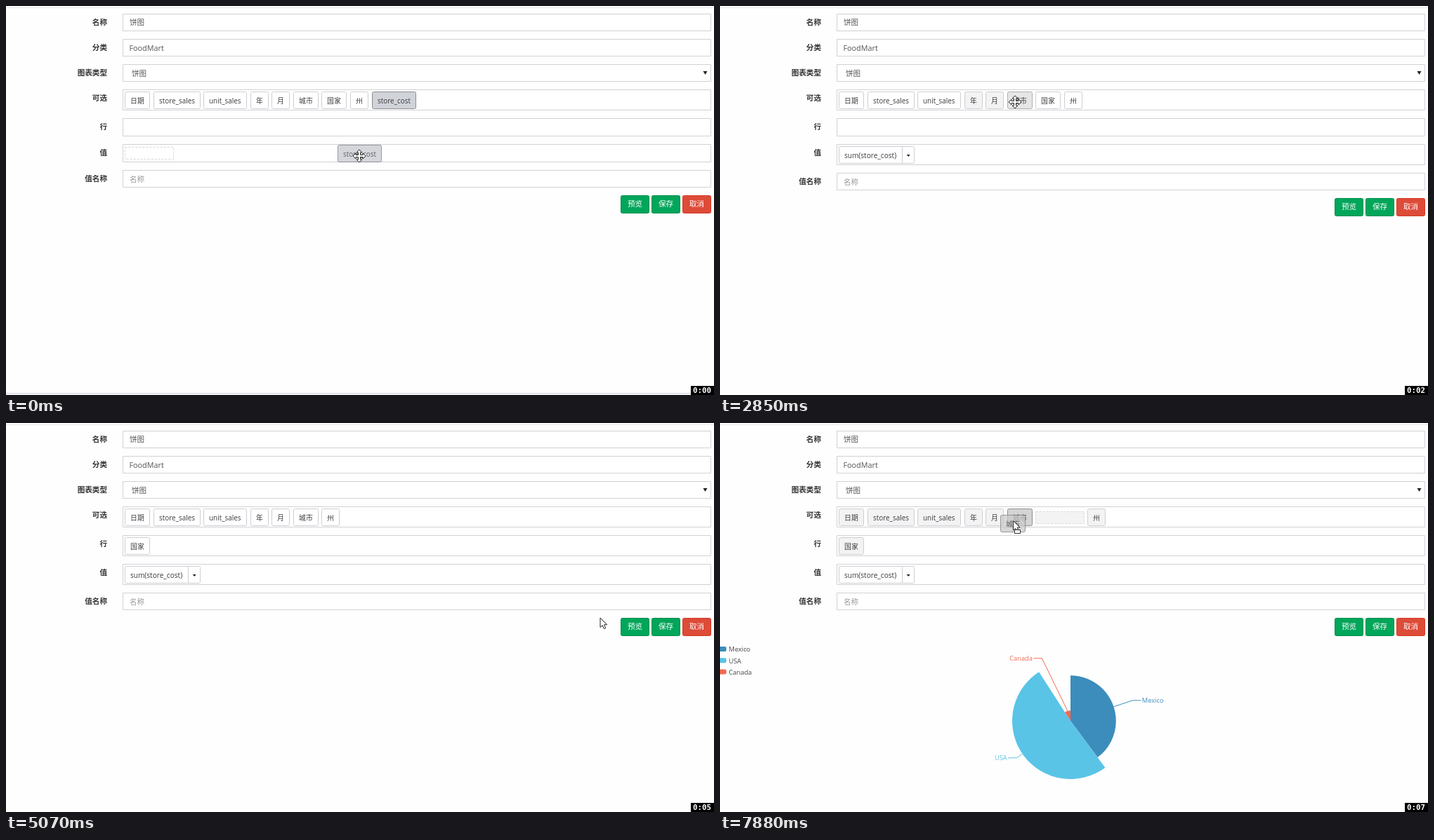
These frames come from a looping animation (1008x555 px, 8 s). An HTML page with a canvas:

```html
<!DOCTYPE html>
<html lang="zh">
<head>
<meta charset="utf-8">
<title>饼图</title>
<style>
html, body { margin: 0; width: 100%; height: 100%; overflow: hidden; background: #fefefe; }
canvas { display: block; width: 1008px; height: 555px; }
</style>
</head>
<body>
<canvas id="stage"></canvas>
<script>
const W = 1008, H = 555, LOOP = 8000;
const STEP = 130, FADE = 280;
const canvas = document.getElementById('stage');
const ctx = canvas.getContext('2d');
const dpr = window.devicePixelRatio || 1;
canvas.width = W * dpr;
canvas.height = H * dpr;

const CJK = '"Noto Sans CJK SC", "Noto Sans CJK", sans-serif';
const FONT = '"Open Sans", ' + CJK;
const MONO = '"DejaVu Sans Mono", monospace';
const LABEL_SIZE = 10.6, CHIP_SIZE = 9.9, CHART_SIZE = 9.3;
const LINE = '#d0d2d6', CHIP_LINE = '#ccced2', PRESSED_LINE = '#8c8c8c';

// Pointer moves: from time, to time, target x, y
const START = { x: 503, y: 214 };
const MOVES = [
  [150, 1310, 392, 141], [1310, 1460, 362, 140], [2720, 2850, 420, 137], [2850, 3100, 467, 135],
  [3350, 4070, 429, 168], [4350, 5170, 893, 290], [5450, 5740, 774, 279], [5740, 6800, 463, 136],
  [6800, 6920, 427, 134], [7730, 7880, 417, 139]
];

const FIELDS = ['日期', 'store_sales', 'unit_sales', '年', '月', '城市', '国家', '州', 'store_cost'];
const DRAGS = [
  { name: 'store_cost', press: 0, start: 0, release: 410, end: 410, grabY: 16, tint: '#d1d3da' },
  { name: '国家', press: 3225, start: 3350, release: 4350, end: 4480, grabY: 9, tint: '#d4d4d4' },
  { name: '城市', press: 7290, start: 7730, release: LOOP, end: LOOP, grabY: 8, tint: '#d4d4d4' }
];
const [COST, COUNTRY, CITY] = DRAGS;
const LEFT = 166, RIGHT = 1004, CHIP_X = 169, CHIP_H = 25, CHIP_PAD = 16.1, GAP = 4.7, SLOT_W = 69;
const PREVIEW = { x: 875, w: 41, h: 26, click: 5450 };

const ease = k => (1 - Math.cos(Math.PI * k)) / 2;

function pointer(t) {
  let p = START;
  for (const [a, b, x, y] of MOVES) {
    if (t < a) break;
    const k = ease(Math.min(1, (t - a) / (b - a)));
    p = { x: p.x + (x - p.x) * k, y: p.y + (y - p.y) * k };
  }
  return p;
}

// The screen refreshes in steps counted from the last start or stop of the pointer
function refresh(t) {
  const anchor = Math.max(0, ...MOVES.flatMap(m => m.slice(0, 2)).filter(v => v <= t));
  return anchor + Math.floor((t - anchor) / STEP) * STEP;
}

function text(s, x, y, size, color, align = 'left', weight = 400, family = FONT) {
  ctx.font = `${weight} ${size}px ${family}`;
  ctx.fillStyle = color;
  ctx.textAlign = align;
  ctx.fillText(s, x, y + size * 0.37);
}

function rect(x, y, w, h, fill) {
  ctx.fillStyle = fill;
  ctx.fillRect(x, y, w, h);
}

function box(x, y, w, h, fill, stroke, r = 0) {
  ctx.beginPath();
  ctx.roundRect(Math.round(x) + 0.5, Math.round(y) + 0.5, Math.round(w) - 1, Math.round(h) - 1, r);
  ctx.fillStyle = fill;
  ctx.fill();
  ctx.strokeStyle = stroke;
  ctx.lineWidth = 1;
  ctx.stroke();
}

function poly(points, fill, stroke) {
  ctx.beginPath();
  points.forEach(([x, y]) => ctx.lineTo(x, y));
  ctx.closePath();
  ctx.fillStyle = fill;
  ctx.fill();
  if (!stroke) return;
  ctx.strokeStyle = stroke;
  ctx.lineWidth = 1;
  ctx.stroke();
}

function caret(x, y, w, h) {
  poly([[x - w / 2, y], [x + w / 2, y], [x, y + h]], '#222');
}

function chipWidth(name) {
  ctx.font = `400 ${CHIP_SIZE}px ${FONT}`;
  return ctx.measureText(name).width + CHIP_PAD;
}

function chip(name, x, y, fill = '#fff', stroke = CHIP_LINE) {
  const w = chipWidth(name);
  box(x, y, w, CHIP_H, fill, stroke, 2);
  text(name, Math.round(x) + w / 2, y + 13, CHIP_SIZE, '#3c3c3c', 'center');
}

function slot(x, y, fill) {
  ctx.setLineDash([3, 2]);
  box(x, y, SLOT_W + 1, 18, fill, '#d6d6d8');
  ctx.setLineDash([]);
}

// Form rows stacked from the top; drop zones grow when they hold a chip
function stackRows(hasCost, hasCountry) {
  const zone = full => full ? 30 : 26;
  let y = 11;
  return [['名称', 25], ['分类', 25], ['图表类型', 25], ['可选', 30],
    ['行', zone(hasCountry)], ['值', zone(hasCost)], ['值名称', 25]].map(([label, h]) => {
    const row = { label, y, h };
    y += h + 11;
    return row;
  });
}

// Field chips still in the list, with the drop slot after the dragged one
function layoutChips(t, slotAfter) {
  const gone = [COST, COUNTRY].filter(d => t >= d.end).map(d => d.name);
  const list = [];
  let x = CHIP_X;
  const add = (name, w) => {
    list.push({ name, x, w });
    x += w + GAP;
  };
  for (const name of FIELDS) {
    if (gone.includes(name)) continue;
    add(name, chipWidth(name));
    if (slotAfter === name) add('', SLOT_W);
  }
  return list;
}

function over(c, p) {
  return c.name && p.x >= c.x && p.x <= c.x + c.w && p.y >= 122 && p.y <= 147;
}

function recentlyOver(c, t) {
  for (let d = 10; d <= FADE; d += 10)
    if (over(c, pointer(t - d))) return true;
  return false;
}

function arrow(x, y) {
  poly([[0, 0], [0, 13.5], [3.2, 10.8], [5.4, 15.6], [7.7, 14.6], [5.6, 9.8], [9.6, 9.6]]
    .map(([a, b]) => [x + a + 0.5, y + b + 0.5]), '#fff', '#222');
}

function moveCursor(x, y) {
  const arm = [[-1.5, -1.5], [-1.5, -5], [-4, -5], [0, -9], [4, -5], [1.5, -5]];
  const points = [];
  for (let q = 0; q < 4; q++) {
    const c = Math.cos(q * Math.PI / 2), s = Math.sin(q * Math.PI / 2);
    for (const [a, b] of arm) points.push([x + a * c - b * s, y + a * s + b * c]);
  }
  poly(points, '#fff', '#222');
}

function hand(x, y) {
  box(x - 4, y + 6, 12, 9, '#fff', '#222', 3);
  box(x - 2, y, 4, 10, '#fff', '#222', 1.5);
}

// Rose pie: the angle and the radius both follow the value
const CX = 499, CY = 425, R = 83;
const DATA = [['Mexico', 430, '#3c8dbc'], ['USA', 551, '#59c4e6'], ['Canada', 98, '#f4684f']];
const TOTAL = DATA.reduce((sum, d) => sum + d[1], 0);
const PEAK = Math.max(...DATA.map(d => d[1]));

function chart(t) {
  const k = Math.min(1, (t - PREVIEW.click + 25) / 1000);
  const sweep = (1 - (1 - k) ** 3) * 2 * Math.PI;
  let from = 0;
  DATA.forEach(([name, value, color], i) => {
    const y = 322.5 + i * 16.3;
    ctx.fillStyle = color;
    ctx.beginPath();
    ctx.roundRect(-3, y - 3.5, 12, 7, 2);
    ctx.fill();
    text(name, 12.5, y + 0.3, CHART_SIZE, '#444');

    const to = from + value / TOTAL * 2 * Math.PI;
    if (sweep > from) {
      const r = R * value / PEAK;
      ctx.beginPath();
      ctx.moveTo(CX, CY);
      ctx.arc(CX, CY, r, from - Math.PI / 2, Math.min(sweep, to) - Math.PI / 2);
      ctx.fillStyle = color;
      ctx.fill();
      leader(name, color, r, (from + to) / 2 - Math.PI / 2);
    }
    from = to;
  });
}

function leader(name, color, r, angle) {
  const c = Math.cos(angle), s = Math.sin(angle), side = Math.sign(c);
  const reach = R + 10;
  const bend = CX + c * reach + side * 20 * s ** 8; // steep labels stand further out
  const y = CY + s * reach, end = bend + side * 12;
  ctx.beginPath();
  ctx.moveTo(CX + c * r, CY + s * r);
  ctx.lineTo(bend, y);
  ctx.lineTo(end, y);
  ctx.strokeStyle = color;
  ctx.lineWidth = 1;
  ctx.stroke();
  text(name, end + side * 1.5, y, CHART_SIZE, color, side > 0 ? 'left' : 'right');
}

function action(label, x, y, fill, stroke) {
  box(x, y, PREVIEW.w, PREVIEW.h, fill, stroke, 2);
  text(label, x + PREVIEW.w / 2, y + 12.5, LABEL_SIZE, '#fff', 'center', 500, CJK);
}

function drawForm(rows) {
  for (const { label, y, h } of rows) {
    text(label, 144, y + 12.5, LABEL_SIZE, '#333', 'right', 700, CJK);
    box(LEFT, y, RIGHT - LEFT, h, '#fff', LINE);
  }
  const [title, group, type, , , , alias] = rows;
  text('饼图', 176, title.y + 12.5, LABEL_SIZE, '#555');
  text('FoodMart', 175.5, group.y + 13, 10.8, '#555');
  text('饼图', 179, type.y + 13.5, LABEL_SIZE, '#555');
  text('名称', 176, alias.y + 13, LABEL_SIZE, '#999');
  caret(995.5, type.y + 10, 6, 5);
}

function drawSum(y) {
  box(CHIP_X, y, 108, CHIP_H, '#fff', CHIP_LINE, 2);
  rect(259, y, 1, CHIP_H, CHIP_LINE);
  text('sum(store_cost)', 214, y + 13, 10.1, '#3c3c3c', 'center');
  caret(268.2, y + 12, 5, 3);
}

function draw(t) {
  ctx.setTransform(dpr, 0, 0, dpr, 0, 0);
  rect(0, 0, W, H, '#fefefe');
  rect(0, 2, W, 1, '#e8e8e8');

  const p = pointer(t);
  const hasCost = t >= COST.end, hasCountry = t >= COUNTRY.end;
  const pressed = DRAGS.find(d => t >= d.press && t < d.end);
  const drag = pressed && t >= pressed.start ? pressed : null;
  const native = drag && drag !== COST;
  const slotOnTop = native && p.y < 150;
  const idle = native ? '#f3f3f3' : '#fff';

  if (!hasCost) {
    rect(0, 552, W, 3, '#eef1f5');
    rect(0, 552, W, 1, '#d6dae1');
  }

  const rows = stackRows(hasCost, hasCountry);
  const [pool, group, value, alias] = rows.slice(3);
  drawForm(rows);

  let hovering = false;
  for (const c of layoutChips(t, slotOnTop && drag.name)) {
    if (!c.name) {
      slot(c.x, pool.y + 7, idle);
      continue;
    }
    const hot = !drag && over(c, p);
    hovering = hovering || hot;
    let fill = idle, stroke = CHIP_LINE;
    if (pressed && pressed.name === c.name) [fill, stroke] = [pressed.tint, PRESSED_LINE];
    else if (hot) [fill, stroke] = ['#e6e6e6', '#adadad'];
    else if (!drag && recentlyOver(c, t)) fill = '#f3f3f3';
    chip(c.name, c.x, pool.y + 3, fill, stroke);
  }

  if (hasCountry) chip(COUNTRY.name, CHIP_X, group.y + 3, idle);
  else if (native && !slotOnTop) slot(CHIP_X, group.y + 4, idle);
  if (hasCost) drawSum(value.y + 3);
  else slot(CHIP_X, value.y + 4, '#fff');

  const y = alias.y + 36;
  const onPreview = p.x > PREVIEW.x && p.x < PREVIEW.x + PREVIEW.w && p.y > y && p.y < y + PREVIEW.h;
  if (t >= PREVIEW.click && t < CITY.press) action('预览', PREVIEW.x, y, '#449d44', '#255625');
  else action('预览', PREVIEW.x, y, onPreview ? '#008d4c' : '#00a65a', '#008d4c');
  action('保存', PREVIEW.x + 44, y, '#00a65a', '#008d4c');
  action('取消', PREVIEW.x + 88, y, '#dd4b39', '#d73925');

  if (t >= PREVIEW.click) chart(t);

  const carrying = drag && t < drag.release;
  if (carrying) {
    ctx.globalAlpha = 0.75;
    chip(drag.name, p.x - chipWidth(drag.name) / 2, Math.round(p.y - drag.grabY), native ? '#cacaca' : '#c6c8d1', '#808080');
    ctx.globalAlpha = 1;
  }

  if (hovering || drag === COST) moveCursor(p.x, p.y);
  else if (onPreview) hand(p.x, p.y);
  else {
    arrow(p.x, p.y);
    if (carrying) box(p.x + 2, p.y + 13, 9, 6, '#fff', '#333');
  }

  rect(975, 542, 33, 13, '#000');
  text('0:0' + Math.floor(t / 1000), 978, 548.3, 10.8, '#fff', 'left', 700, MONO);
}

function frame(now) {
  draw(refresh(now % LOOP));
  requestAnimationFrame(frame);
}
requestAnimationFrame(frame);
</script>
</body>
</html>
```
